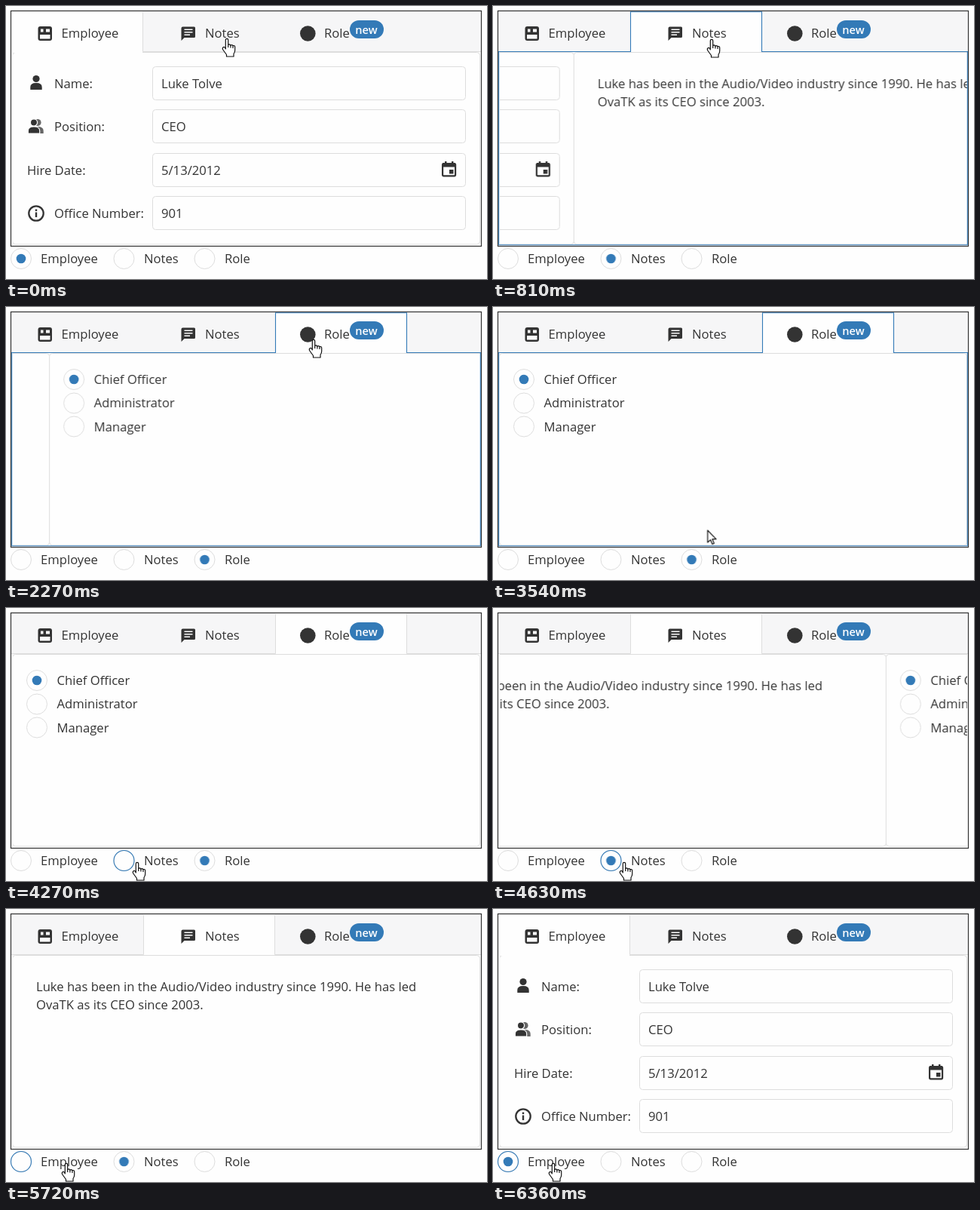
Write an HTML page that moves like this. It is 638 by 362 pixels and loops after 6450 ms.

```html
<!DOCTYPE html>
<html lang="en">
<head>
<meta charset="utf-8">
<title>Tab panel</title>
<style>
html, body { margin: 0; width: 100%; height: 100%; overflow: hidden; background: #fefefe; }
svg { display: block; width: 638px; height: 362px; font: 16.65px "Open Sans", "Noto Sans", sans-serif; fill: #333; }
.page { fill: #fefefe; }
.bar { fill: #f6f6f7; }
.line { fill: none; stroke: #ddd; }
.blue { fill: none; stroke: #337ab7; stroke-width: 1.1; }
.dot { fill: #337ab7; }
.tab0, .tab1, .tab2, .focus, .hover, .ring0, .ring1, .arrow, .hand { animation: 6450ms step-end infinite; }
.tab0 { animation-name: tab0; }
.tab1 { animation-name: tab1; }
.tab2 { animation-name: tab2; }
.focus { animation-name: focus; }
.hover { animation-name: hover; }
.ring0 { animation-name: ring0; }
.ring1 { animation-name: ring1; }
.arrow { animation-name: arrow; }
.hand { animation-name: hand; }
.track { animation: track 6450ms cubic-bezier(.215, .61, .355, 1) infinite; }
.cursor { animation: cursor 6450ms linear infinite; }

@keyframes tab0 { 0%, 89.77% { opacity: 1 } 9.77% { opacity: 0 } 100% { opacity: 1 } }
@keyframes tab1 { 0%, 31.6%, 89.77%, 100% { opacity: 0 } 9.77%, 69.1% { opacity: 1 } }
@keyframes tab2 { 0%, 69.1%, 100% { opacity: 0 } 31.6% { opacity: 1 } }
@keyframes focus { 0%, 66.2%, 100% { opacity: 0 } 9.77% { opacity: 1 } }
@keyframes hover { 0%, 31.6%, 100% { opacity: 0 } 24% { opacity: 1 } }
@keyframes ring1 { 0%, 88.37%, 100% { opacity: 0 } 66.2% { opacity: 1 } }
@keyframes ring0 { 0% { opacity: 0 } 88.37%, 100% { opacity: 1 } }
@keyframes arrow { 0%, 57.2%, 100% { opacity: 0 } 47.9% { opacity: 1 } }
@keyframes hand { 0%, 57.2%, 100% { opacity: 1 } 47.9% { opacity: 0 } }
@keyframes track {
  0%, 9.77% { transform: translateX(0) }
  15.97%, 31.6% { transform: translateX(-620px) }
  37.8%, 69.1% { transform: translateX(-1240px) }
  75.3%, 89.77% { transform: translateX(-620px) }
  95.97%, 100% { transform: translateX(0) }
}
@keyframes cursor {
  0%, 1.4% { transform: translate(293px, 43px) }
  7%, 19.7% { transform: translate(290px, 44px) }
  25.27% { transform: translate(380px, 47px) }
  29.5%, 46.5% { transform: translate(408px, 43px) }
  50.5% { transform: translate(365px, 145px) }
  54.88% { transform: translate(285px, 296px) }
  58.5% { transform: translate(222px, 331px) }
  64.5%, 76.8% { transform: translate(174px, 337px) }
  80.31% { transform: translate(106px, 335px) }
  83.8%, 100% { transform: translate(80px, 337px) }
}
</style>
</head>
<body>
<svg viewBox="0 0 638 362">
  <defs>
    <clipPath id="view"><path d="M9 61H629V318H9Z"/></clipPath>
    <circle id="ring" r="13.5" class="line"/>
    <circle id="dot" r="6.3" class="dot"/>
    <rect id="box" x="194.5" width="415" height="44" rx="4" class="line"/>
    <rect id="panel" x="8.5" y="61.5" width="620" height="254.5" rx="4" class="line"/>
    <g id="user">
      <circle cy="-5.5" r="4.6"/>
      <path d="M-7.7 9V5.5Q-7.7 0 0 0T7.7 5.5V9Z"/>
    </g>
  </defs>

  <path class="bar" d="M7 7H630V60H7Z"/>
  <path class="page hover" d="M357 8H531V60H357Z"/>

  <!-- sliding panels -->
  <g clip-path="url(#view)">
    <g class="track">
      <use href="#panel"/>
      <use href="#user" x="40" y="102"/>
      <use href="#user" x="42" y="160" opacity=".75"/>
      <use href="#user" x="37" y="160" stroke="#fefefe" stroke-width="1.2"/>
      <circle cx="40" cy="275" r="9.7" fill="none" stroke="#333" stroke-width="2.3"/>
      <path d="M38.8 273.5h2.4v6.5h-2.4zM38.8 269.5h2.4v2.4h-2.4z"/>
      <text x="64" y="109">Name:</text>
      <text x="64" y="166">Position:</text>
      <text x="28" y="224">Hire Date:</text>
      <text x="64" y="281">Office Number:</text>
      <use href="#box" y="80.5"/>
      <use href="#box" y="137.5"/>
      <use href="#box" y="195.5"/>
      <use href="#box" y="252.5"/>
      <text x="206" y="109">Luke Tolve</text>
      <text x="206" y="166">CEO</text>
      <text x="206" y="224">5/13/2012</text>
      <text x="206" y="281">901</text>
      <g transform="translate(578 206)">
        <path d="M4 0h2.5v3H4zM13 0h2.5v3H13z"/>
        <rect x="1.1" y="3" width="17" height="16.3" rx="1.5" fill="none" stroke="#333" stroke-width="2.2"/>
        <path d="M1 2H18V7.5H1zM10 11h5.5v5.5H10z"/>
      </g>

      <g transform="translate(620)">
        <use href="#panel"/>
        <text x="40" y="109">Luke has been in the Audio/Video industry since 1990. He has led</text>
        <text x="40" y="133">OvaTK as its CEO since 2003.</text>
      </g>

      <g transform="translate(1240)">
        <use href="#panel"/>
        <use href="#ring" x="41" y="96"/>
        <use href="#ring" x="41" y="127.5"/>
        <use href="#ring" x="41" y="158.5"/>
        <use href="#dot" x="41" y="96"/>
        <text x="67.5" y="102">Chief Officer</text>
        <text x="67.5" y="133">Administrator</text>
        <text x="67.5" y="165">Manager</text>
      </g>
    </g>
  </g>

  <!-- active tab and focus outline -->
  <g class="tab0">
    <path class="page" d="M7 7H181V62H7Z"/>
    <path class="line" d="M181.5 8V60.5H630"/>
  </g>
  <g class="tab1">
    <path class="page" d="M182 7H357V61H182Z"/>
    <path class="line" d="M7 60.5H182.5V8M356.5 8V60.5H630"/>
  </g>
  <g class="tab2">
    <path class="page" d="M357 7H531V61H357Z"/>
    <path class="line" d="M7 60.5H357.5V8M531.5 8V60.5H630"/>
  </g>
  <rect x="6.5" y="6.5" width="624" height="312" fill="none" stroke="#333" stroke-width="1.2"/>
  <g class="focus">
    <path class="blue" d="M7.7 60V316.7H629.3V60"/>
    <path class="blue tab1" d="M7 60.5H182.5V7.7H356.5V60.5H630"/>
    <path class="blue tab2" d="M7 60.5H357.5V7.7H531.5V60.5H630"/>
  </g>

  <!-- tab captions -->
  <rect x="42.5" y="27" width="18.5" height="19" rx="3"/>
  <path class="page" d="M46 30.5h3.5v4H46zM53 30.5h5v4h-5zM45 38h13.5v5.5H45z"/>
  <path d="M234.5 27.5H249.5Q251 27.5 251 29V40.5Q251 42 249.5 42H236.5L232.5 46V29.5Q232.5 27.5 234.5 27.5Z"/>
  <path d="M236.5 31.3h11M236.5 34.8h11M236.5 38.3h7.5" stroke="#fefefe" stroke-width="1.6"/>
  <circle cx="400.3" cy="36.5" r="10.3"/>
  <text x="73.5" y="42">Employee</text>
  <text x="264" y="42">Notes</text>
  <text x="422" y="42">Role</text>
  <rect class="dot" x="456" y="19" width="45" height="24" rx="12"/>
  <text x="478" y="36.5" text-anchor="middle" font-size="14.6" font-weight="600" fill="#fff">new</text>

  <!-- radio group -->
  <use href="#ring" x="20" y="335"/>
  <use href="#ring" x="156.5" y="335"/>
  <use href="#ring" x="263.5" y="335"/>
  <circle class="blue ring0" cx="20" cy="335" r="13.5"/>
  <circle class="blue ring1" cx="156.5" cy="335" r="13.5"/>
  <use class="tab0" href="#dot" x="20" y="335"/>
  <use class="tab1" href="#dot" x="156.5" y="335"/>
  <use class="tab2" href="#dot" x="263.5" y="335"/>
  <text x="46" y="341">Employee</text>
  <text x="183" y="341">Notes</text>
  <text x="290" y="341">Role</text>

  <g class="cursor" fill="#fff" stroke="#111" stroke-width="1.2" stroke-linejoin="round">
    <path class="arrow" d="M0 0V16L3.7 12.6L6.2 18.3L8.6 17.2L6.2 11.7H11.3Z"/>
    <g class="hand">
      <path d="M-1.7 14V2a1.7 1.7 0 0 1 3.4 0V8.5q1.7-1.3 3.2.6 1.8-1.2 3.1.6 2.7-.8 2.7 1.8V15.5q0 2.8-1.7 5V24H-.5V21.5L-5.2 15Q-6.5 12.3-4.6 11.6T-1.7 14Z"/>
      <path d="M1.7 8.5V12M4.9 9.1V12.5M8 9.7V13" fill="none"/>
    </g>
  </g>
</svg>
</body>
</html>
```
